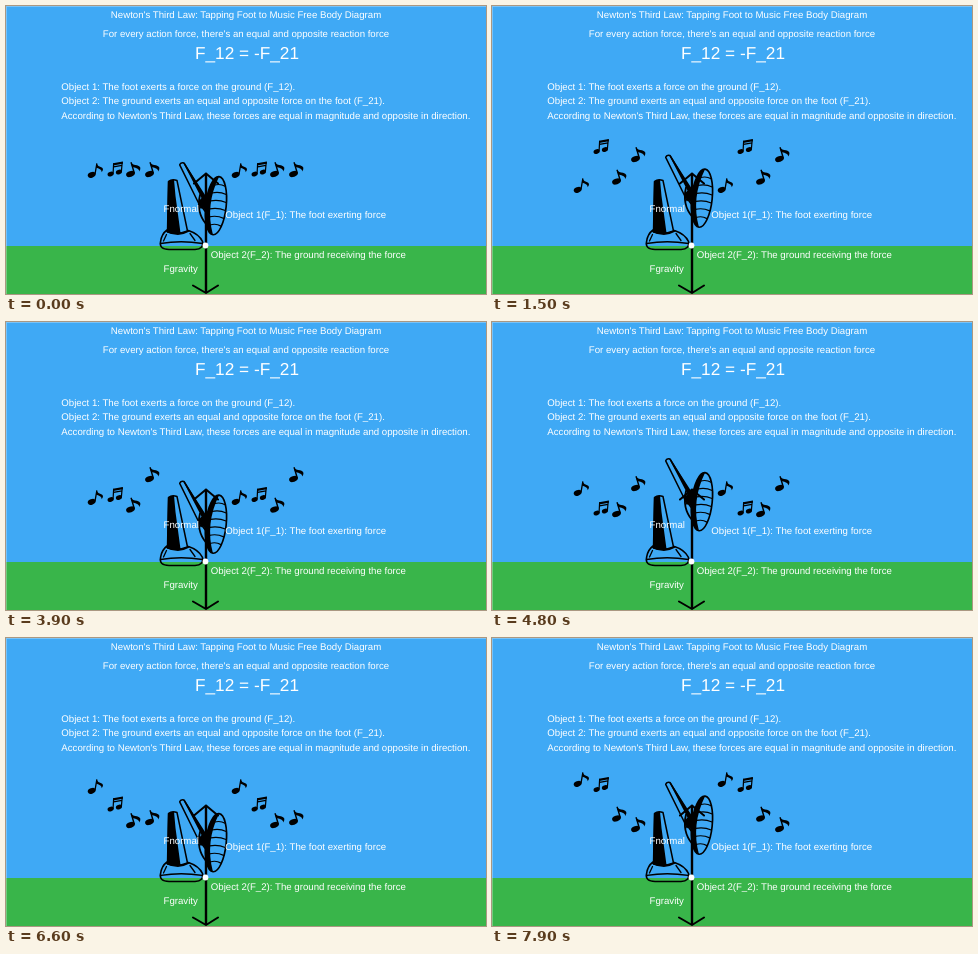
An HTML page for the animation above (8000 ms loop, 480 by 288 pixels).

```html
<!DOCTYPE html>
<html lang="en">
<head>
<meta charset="utf-8">
<title>Newton's Third Law</title>
<style>
  html, body { margin: 0; width: 100%; height: 100%; overflow: hidden; background: #3fa9f5; }
  svg { display: block; width: 480px; height: 288px; }
  text { font: 9.67px "Liberation Sans", Arial, sans-serif; fill: #fff; text-rendering: geometricPrecision; }
  .mid { text-anchor: middle; }
  .big { font-size: 17.25px; }
  .line { fill: none; stroke: #000; stroke-linecap: round; stroke-linejoin: round; }
</style>
</head>
<body>
<svg viewBox="0 0 480 288">
  <defs>
    <!-- Notes have their top left corner at the origin -->
    <g id="single">
      <ellipse cx="4.2" cy="11.8" rx="4.1" ry="2.8" transform="rotate(-22 4.2 11.8)"/>
      <path class="line" stroke-width="1.3" d="M7.6 10.7 9.3 .8"/>
      <path d="M8.8 .2Q10.3 3.4 13.8 4.2Q17 5.5 14.2 9.2Q14.4 6.2 8.5 4.6Z"/>
    </g>
    <g id="curl">
      <ellipse cx="4.5" cy="12" rx="4.5" ry="2.8" transform="rotate(-18 4.5 12)"/>
      <path class="line" stroke-width="1.4" d="M8.2 10.8 5.2 .8"/>
      <path d="M4.600 .3Q7 3.300 11 3.300Q16.500 4.800 13.200 9.500Q13.500 6.300 6.300 5Z"/>
    </g>
    <g id="pair">
      <ellipse cx="3" cy="12.6" rx="3.1" ry="2.3" transform="rotate(-20 3 12.6)"/>
      <ellipse cx="11.3" cy="10.600" rx="3.1" ry="2.3" transform="rotate(-20 11.3 10.600)"/>
      <path class="line" stroke-width="1.2" d="M5.500 11.900 6 2.400M13.800 9.900 14.600 .9M6 5.300 14.300 3.800"/>
      <path d="M5.400 1.800 15.200 .1V2.300L5.400 4Z"/>
    </g>
  </defs>

  <rect width="480" height="288" fill="#3fa9f5"/>
  <rect y="240" width="480" height="48" fill="#39b54a"/>
  <path d="M0 0H480V1H1V288H0Z" fill="#fff" opacity=".3"/>

  <!-- Resting foot -->
  <path class="line" stroke-width="1.5" d="M162.500 175.500Q166 172.500 171 174.500L181.500 225Q171 229 161.500 226Z"/>
  <path d="M162 175 168 173.500 169.500 190 174.500 227Q167 229 161 226Z"/>
  <path class="line" stroke-width="2" d="M161 225Q172 231 182.500 225"/>
  <path class="line" stroke-width="1.600" d="M154.500 236Q153 243.300 163 243.500H189Q198 243 196.500 235.500Q193 228 182.500 224.500M154.500 236Q155.500 228 161 224"/>
  <path class="line" stroke-width="1.300" d="M154.500 237.500Q175 234 196.500 237.500M160.500 228.500 157.500 235M184 227.500 189 234.500"/>

  <path class="line" stroke-width="2.400" d="M200 168V286"/>
  <path class="line" stroke-width="2" d="M188 177.500 200 167.500 212 177.500M187 279.500 200 287 212 279.500"/>

  <!-- Tapping foot -->
  <g id="foot">
    <path class="line" stroke-width="1.500" d="M173.700 158.800Q174.500 156 178 157L200 194 195 202Z"/>
    <path d="M177 156.500 179 157.500 201 192 200 205 192 196 195.500 192Z"/>
    <path class="line" stroke-width="1.800" d="M194 189Q190 206 200 218M193 197 199 205"/>
    <g transform="rotate(6 210 199.700)">
      <ellipse class="line" stroke-width="1.700" cx="210" cy="199.700" rx="10.200" ry="29.200"/>
      <path d="M210 170.500A10.200 29.200 0 0 0 210 229Q199 200 210 170.500Z"/>
      <path class="line" stroke-width="1.200" d="M206 179.500Q212 177 217 179.500M204.500 187.500Q212 185 219 187.500M204 195.500Q212 193 219.700 195.500M204 203.500Q212 201 219.700 203.500M204.500 211.500Q212 209 219 211.500M206 219.500Q212 217 217 219.500"/>
    </g>
  </g>

  <circle cx="199.500" cy="239.500" r="2.900" fill="#fff"/>
  <g id="notes"></g>

  <text class="mid" x="240" y="12.200">Newton's Third Law: Tapping Foot to Music Free Body Diagram</text>
  <text class="mid" x="240" y="31.300">For every action force, there's an equal and opposite reaction force</text>
  <text class="mid big" x="241" y="53">F_12 = -F_21</text>
  <text x="55.300" y="83.800">Object 1: The foot exerts a force on the ground (F_12).</text>
  <text x="55.300" y="98.200">Object 2: The ground exerts an equal and opposite force on the foot (F_21).</text>
  <text x="55.300" y="112.600">According to Newton's Third Law, these forces are equal in magnitude and opposite in direction.</text>
  <text x="157.500" y="206">Fnormal</text>
  <text x="219.300" y="211.700">Object 1(F_1): The foot exerting force</text>
  <text x="204.800" y="252">Object 2(F_2): The ground receiving the force</text>
  <text x="157.500" y="266">Fgravity</text>
</svg>
<script>
  const STEP = 100, LOOP = 8000, FOOT_TOP = 156;
  const foot = document.getElementById('foot');
  const layer = document.getElementById('notes');

  // glyph, left edge, starting top, pixels per step
  const notes = [
    ['single', 81.5, 157, 1],
    ['pair', 101.6, 155.5, -1.5],
    ['curl', 120, 156, 0.5],
    ['curl', 139, 156, -1]
  ].map(([glyph, x, y, speed]) => {
    const el = document.createElementNS('http://www.w3.org/2000/svg', 'g');
    el.innerHTML = [x, x + 144].map(left => `<use href="#${glyph}" x="${left}"/>`).join('');
    layer.append(el);
    return { el, y, speed };
  });

  // Steady travel that turns back at both limits
  function bounce(start, speed, low, high, n) {
    const span = high - low, lap = 2 * span;
    const u = ((start - low + speed * n) % lap + lap) % lap;
    return low + Math.min(u, lap - u);
  }

  const begin = performance.now();

  function draw() {
    const n = Math.floor((performance.now() - begin) % LOOP / STEP);
    const lift = bounce(FOOT_TOP, 2.5, 136, 171, n) - FOOT_TOP;
    foot.setAttribute('transform', `translate(0 ${lift})`);
    for (const { el, y, speed } of notes)
      el.setAttribute('transform', `translate(0 ${bounce(y, speed, 131, 182, n)})`);
    requestAnimationFrame(draw);
  }
  draw();
</script>
</body>
</html>
```
